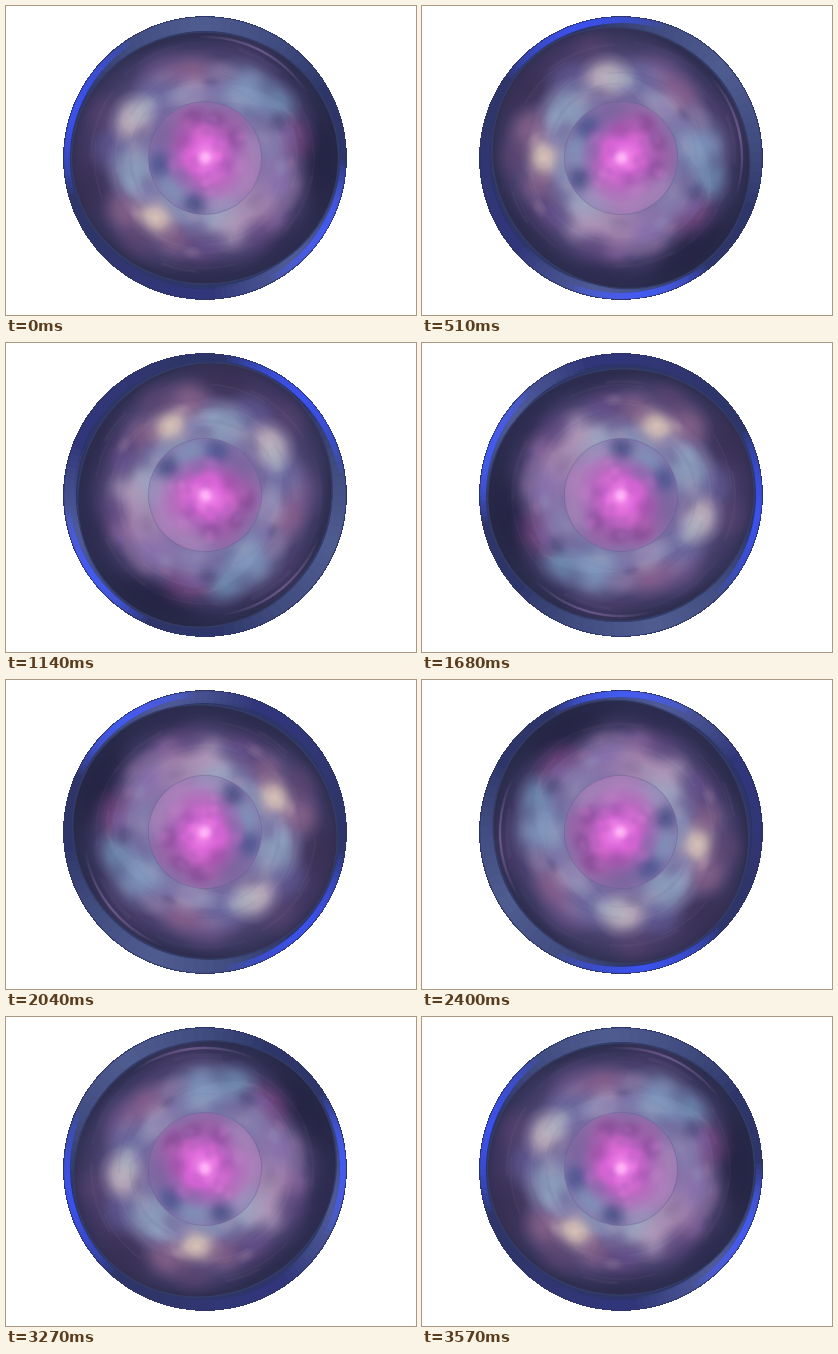
Write an HTML page that moves like this. It is 410 px wide and 309 px high and loops after 3.6 s.

```html
<!DOCTYPE html>
<html lang="en">
<head>
<meta charset="utf-8">
<title>Orb</title>
<style>
html, body { margin: 0; width: 100%; height: 100%; overflow: hidden; background: #fff; }
svg { display: block; width: 410px; height: 309px; }
</style>
</head>
<body>
<svg viewBox="0 0 410 309">
  <defs>
    <radialGradient id="body" cx=".48" cy=".5" r=".52">
      <stop offset="0" stop-color="#8474a8"/>
      <stop offset=".5" stop-color="#75689c"/>
      <stop offset=".66" stop-color="#605586"/>
      <stop offset=".82" stop-color="#443d69"/>
      <stop offset=".92" stop-color="#302f52"/>
      <stop offset="1" stop-color="#292c4c"/>
    </radialGradient>
    <radialGradient id="glow">
      <stop offset="0" stop-color="#fba0f2"/>
      <stop offset=".12" stop-color="#f284ea"/>
      <stop offset=".35" stop-color="#e262dc" stop-opacity=".88"/>
      <stop offset=".62" stop-color="#c656c4" stop-opacity=".5"/>
      <stop offset="1" stop-color="#a253b0" stop-opacity="0"/>
    </radialGradient>
    <clipPath id="core"><circle r="56.5"/></clipPath>
    <clipPath id="inside"><ellipse rx="133" ry="125.5"/></clipPath>
  </defs>
  <circle cx="199" cy="152" r="142" fill="#2e3669" shape-rendering="crispEdges"/>
  <g id="orb"></g>
</svg>
<script>
const NS = 'http://www.w3.org/2000/svg';
const CX = 199, CY = 152, LOOP = 3600, STEP = 30;
const orb = document.getElementById('orb');
const defs = document.querySelector('defs');

function add(parent, tag, attrs) {
  const el = document.createElementNS(NS, tag);
  for (const k in attrs) el.setAttribute(k, attrs[k]);
  parent.appendChild(el);
  return el;
}

let seed = 11;
const rnd = (a, b) => {
  seed = (seed * 16807) % 2147483647;
  return a + (b - a) * seed / 2147483647;
};

// Soft-edged fill for a colour, made once per colour.
const fills = {};
function soft(color) {
  if (!fills[color]) {
    const id = 's' + color.slice(1);
    const g = add(defs, 'radialGradient', { id });
    [[0, 1], [.35, .8], [.7, .27], [1, 0]].forEach(([offset, o]) =>
      add(g, 'stop', { offset, 'stop-color': color, 'stop-opacity': o }));
    fills[color] = `url(#${id})`;
  }
  return fills[color];
}

// Cloud at stage point x, y, stretched along its orbit.
function cloud(parent, x, y, size, color, opacity = .8, stretch = 1.2) {
  const dx = x - CX, dy = y - CY;
  const turn = Math.atan2(dy, dx) * 180 / Math.PI;
  add(parent, 'ellipse', {
    cx: Math.hypot(dx, dy), rx: size, ry: size * stretch,
    transform: `rotate(${turn})`, fill: soft(color), opacity
  });
}

function arc(parent, r, mid, half, width, color, opacity) {
  const p = d => {
    const a = d * Math.PI / 180;
    return (r * Math.cos(a)).toFixed(2) + ' ' + (r * Math.sin(a)).toFixed(2);
  };
  add(parent, 'path', {
    d: `M${p(mid - half)}A${r} ${r} 0 0 1 ${p(mid + half)}`,
    fill: 'none', stroke: color, 'stroke-width': width, opacity
  });
}

// Stacked arcs fade out toward their ends.
function shine(parent, r, mid, half, width, color, opacity) {
  for (let i = 1; i <= 14; i++) arc(parent, r, mid, half * i / 14, width, color, opacity);
}

shine(orb, 136, 95, 45, 10, '#3c46a0', .03);
shine(orb, 135, 48, 38, 12, '#6a74b8', .06);
shine(orb, 134, 268, 60, 14, '#6670a8', .06);
shine(orb, 138, 201, 36, 6, '#4259ff', .13);
shine(orb, 138, 31, 30, 6, '#485fff', .13);

add(orb, 'ellipse', { rx: 133.5, ry: 126, fill: 'url(#body)', stroke: '#353d66', 'stroke-width': 1.5 });

const inside = add(orb, 'g', { 'clip-path': 'url(#inside)' });
const dark = [
  [313, 155, 34, '#222140', .85, 2.2], [277, 237, 32, '#2d2a50', .6, 1.8],
  [200, 268, 24, '#2b2a4c', .6, 2.5], [87, 180, 32, '#372d50', .8, 1.7],
  [85, 130, 24, '#41345f', .5, 2],
  [240, 52, 30, '#4d3d6c', .55, 1.6], [110, 72, 28, '#39365c', .45, 1.6]
];
const nebula = [
  [160, 70, 30, '#77598f', .7], [188, 68, 26, '#98648f', .65],
  [240, 86, 36, '#829fc4', .85], [272, 97, 24, '#6e93b6', .7],
  [150, 88, 26, '#6a6ba1', .75], [126, 113, 26, '#c3b8c0', .9],
  [139, 103, 18, '#adb5c2', .6],
  [185, 88, 24, '#8d8db8', .7], [214, 70, 20, '#7d719f', .7],
  [105, 143, 24, '#5c5590', .7], [129, 163, 32, '#8fa8c2', .8],
  [119, 206, 25, '#94668a', .65],
  [150, 212, 24, '#dcc6b8', .95], [168, 234, 23, '#8f6286', .6],
  [132, 233, 24, '#644570', .55], [174, 188, 30, '#8da8c2', .8],
  [213, 210, 34, '#a3adc6', .85], [229, 224, 25, '#b79bba', .75],
  [195, 242, 26, '#5b4279', .65], [250, 198, 32, '#ba96b8', .8],
  [266, 214, 22, '#8e659a', .6],
  [250, 230, 22, '#5d467d', .65], [270, 172, 36, '#9478b0', .75],
  [287, 133, 27, '#7e4582', .65], [263, 133, 30, '#8a85b4', .75],
  [272, 116, 13, '#434172', .5], [95, 106, 23, '#5b4470', .45],
  [188, 219, 16, '#655b90', .5], [141, 187, 16, '#8280ae', .7]
];
[...dark, ...nebula].forEach(c => cloud(inside, ...c));

// Faint swirling streaks and mottling.
const tints = ['#a7c4da', '#b587ae', '#353063', '#7a65b4', '#c4a4b5'];
const tint = () => tints[Math.floor(rnd(0, tints.length))];
for (let i = 0; i < 55; i++)
  arc(inside, rnd(70, 116), rnd(0, 360), rnd(6, 24), rnd(1, 4), tint(), rnd(.02, .06));
for (let i = 0; i < 40; i++) {
  const a = rnd(0, 7), r = rnd(60, 100);
  cloud(inside, CX + r * Math.cos(a), CY + r * Math.sin(a), rnd(6, 13), tint(), rnd(.1, .24), 1.7);
}

// Glassy reflections.
add(inside, 'path', {
  d: 'M-82 -30C-58 -86 57 -89 88 -42C52 -62 -48 -62 -82 -30Z',
  fill: '#b7cbdc', opacity: .06
});
shine(inside, 121, 297, 30, 2.5, '#a292c0', .035);

const core = add(orb, 'g', { 'clip-path': 'url(#core)' });
add(core, 'circle', { r: 57, fill: '#8a72ac', opacity: .6 });
[
  [155, 159, 20, '#4b5490', .85], [190, 197, 18, '#4a5086', .85],
  [166, 181, 20, '#7c92b7', .75], [216, 197, 22, '#9a94bd', .75],
  [238, 172, 27, '#b684bf', .8], [160, 130, 22, '#7a619c', .7],
  [188, 116, 28, '#aa58a7', .75], [224, 119, 27, '#9f60a6', .75],
  [245, 146, 24, '#aa84b9', .8], [215, 180, 24, '#bc7fc2', .75]
].forEach(c => cloud(core, ...c));
add(core, 'circle', { cx: 1, cy: -2, r: 47, fill: 'url(#glow)' });
[
  [187, 111, 13, '#77408a', .5], [211, 113, 12, '#7a438c', .45],
  [229, 133, 13, '#854596', .5], [222, 157, 11, '#944fa8', .4],
  [177, 136, 13, '#9a459f', .4], [198, 129, 15, '#e973de', .5],
  [211, 138, 14, '#e56ddc', .5], [184, 153, 15, '#e266da', .5],
  [206, 168, 15, '#dd74da', .5], [234, 160, 12, '#c083c6', .5],
  [176, 170, 12, '#8766a8', .5]
].forEach(c => cloud(core, ...c));
for (let i = 0; i < 24; i++) {
  const a = rnd(0, 7), r = rnd(10, 46);
  cloud(core, CX + r * Math.cos(a), CY + r * Math.sin(a), rnd(5, 9),
    i % 2 ? '#ef8fe6' : '#77509a', rnd(.1, .22));
}
cloud(core, CX, CY, 9, '#ffc4f8', .65, 1);
add(orb, 'circle', { r: 56.5, fill: 'none', stroke: '#605a8a', 'stroke-width': 1, opacity: .35 });

function draw(now) {
  const t = Math.floor((now % LOOP) / STEP) * STEP;
  orb.setAttribute('transform', `translate(${CX} ${CY}) rotate(${t / LOOP * 360})`);
}
const start = performance.now();
function tick() {
  draw(performance.now() - start);
  requestAnimationFrame(tick);
}
tick();
</script>
</body>
</html>
```
